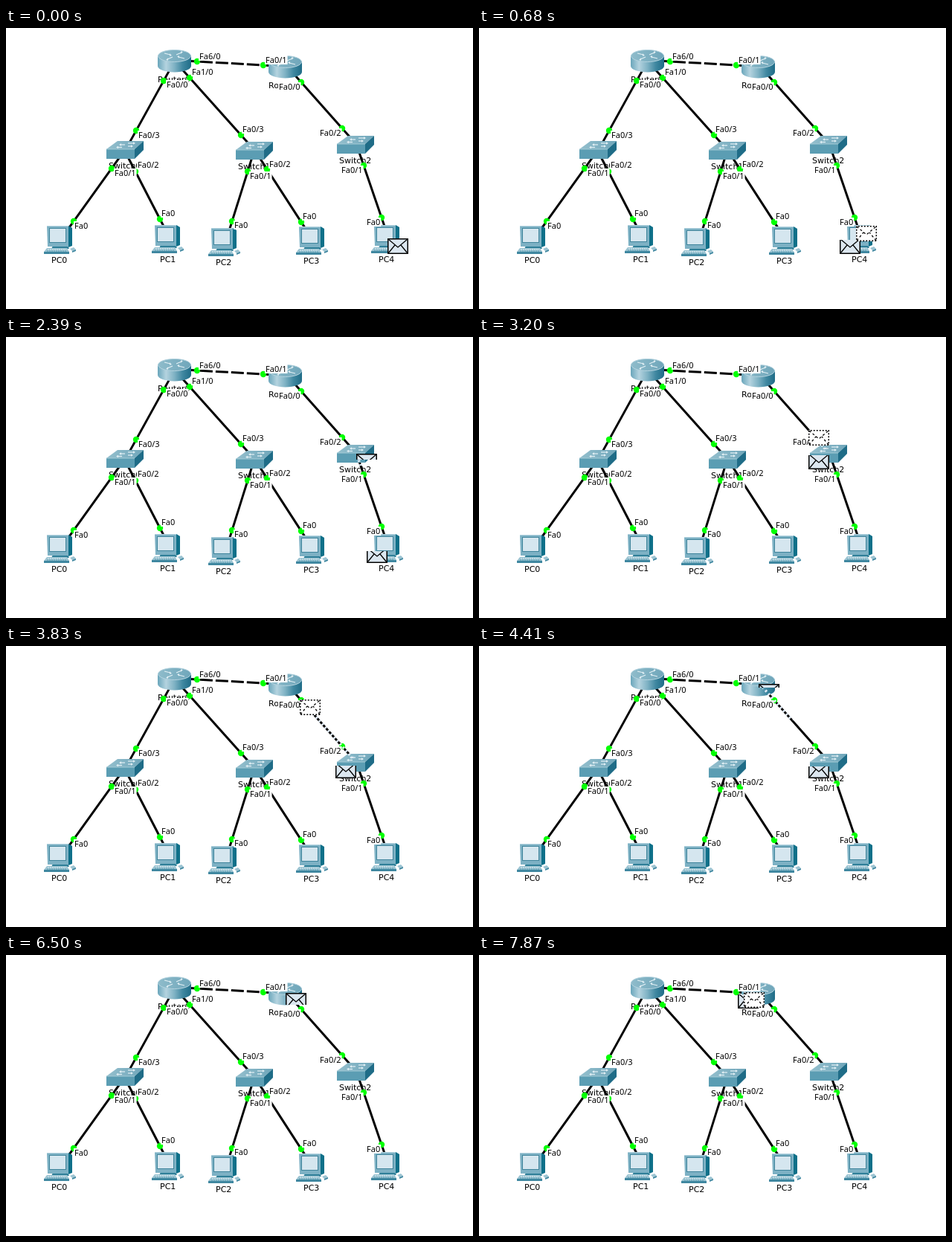
These frames come from a looping animation (628x378 px, 8 s). An HTML page with a canvas:

```html
<!DOCTYPE html>
<html lang="en">
<head>
<meta charset="utf-8">
<title>Packet travelling through a network</title>
<style>
html, body { margin: 0; width: 628px; height: 378px; overflow: hidden; background: #fff; }
canvas { display: block; }
</style>
</head>
<body>
<canvas id="stage" width="628" height="378"></canvas>
<script>
const ctx = document.getElementById('stage').getContext('2d');
const LOOP = 8000, TICK = 142;
const ENV_W = 28, ENV_H = 21;

// name: [kind, centre x, centre y, label x, label baseline]
const devices = {
  Router0: ['router', 226, 44, 204, 73],
  Router1: ['router', 375, 52, 353, 81],
  Switch0: ['switch', 160, 164, 138, 189],
  Switch1: ['switch', 334, 165, 312, 190],
  Switch2: ['switch', 470, 157, 448, 182],
  PC0: ['pc', 72, 284, 61, 316],
  PC1: ['pc', 217, 283, 207, 315],
  PC2: ['pc', 293, 287, 282, 319],
  PC3: ['pc', 411, 285, 400, 317],
  PC4: ['pc', 512, 283, 501, 315]
};

// Cables, given by the two status lights on each.
const dashedLink = [[257, 45], [346, 50]];
const routerLink = [[397, 73], [452, 135]];
const pcLink = [[481, 185], [505, 255]];
const links = [
  dashedLink, routerLink, pcLink,
  [[212, 71], [175, 138]], [[247, 67], [316, 144]],
  [[142, 189], [91, 260]], [[174, 193], [207, 257]],
  [[325, 193], [304, 260]], [[351, 190], [397, 261]]
];

const ports = [
  ['Fa6/0', 260, 42], ['Fa1/0', 250, 63], ['Fa0/0', 216, 80],
  ['Fa0/1', 349, 47], ['Fa0/0', 367, 83], ['Fa0/3', 178, 148],
  ['Fa0/3', 318, 140], ['Fa0/2', 177, 188], ['Fa0/1', 146, 199],
  ['Fa0/2', 354, 187], ['Fa0/1', 328, 203], ['Fa0/2', 422, 145],
  ['Fa0/1', 451, 195], ['Fa0', 92, 270], ['Fa0', 209, 253],
  ['Fa0', 307, 269], ['Fa0', 399, 257], ['Fa0', 485, 265]
];

// Each hop: start, arrival, end of its ghost, packet corners, progress per tick.
const hops = [
  { start: 530, arrive: 1670, ghostEnd: 2810, from: [513, 283], to: [471, 157], step: 2 / 15, link: pcLink },
  { start: 2810, arrive: 3990, ghostEnd: 6100, from: [471, 157], to: [376, 51], step: 0.1, link: routerLink },
  { start: 7750, arrive: 9000, ghostEnd: 9000, from: [376, 51], to: [226, 44], step: 2 / 15 }
];

// Times at which the packet at the second router gains a row.
const rowTimes = [5250, 5520, 5800, 6100, 6300, 6500, 6770, 6910, 7050, 7330, 7480];

const ticks = (t, start, len = TICK) => Math.floor((t - start) / len + 0.15);
const mix = (a, b, p) => a.map((v, i) => v + (b[i] - v) * p);

function poly(color, ...pts) {
  ctx.fillStyle = color;
  ctx.beginPath();
  for (let i = 0; i < pts.length; i += 2) ctx.lineTo(pts[i], pts[i + 1]);
  ctx.fill();
}

function line(a, b, color, width, dash = [], offset = 0) {
  ctx.strokeStyle = color;
  ctx.lineWidth = width;
  ctx.setLineDash(dash);
  ctx.lineDashOffset = offset;
  ctx.beginPath();
  ctx.moveTo(...a);
  ctx.lineTo(...b);
  ctx.stroke();
  ctx.setLineDash([]);
}

// A cable runs past its lights to the middle of both devices.
function cable([a, b], color, width, dash, offset) {
  line(mix(a, b, -0.36), mix(a, b, 1.36), color, width, dash, offset);
}

function arrow(x, y, dx, dy) {
  line([x, y], [x + dx, y + dy], '#e3f0f5', 1.2);
  const s = Math.sign(dx), ex = x + dx, ey = y + dy;
  poly('#e3f0f5', ex + 2 * s, ey + Math.sign(dy), ex - s, ey - 1.7, ex - s, ey + 1.7);
}

function shade(x0, x1, ...colors) {
  const g = ctx.createLinearGradient(x0, 0, x1, 0);
  colors.forEach((c, i) => g.addColorStop(i / (colors.length - 1), c));
  return g;
}

const icons = {
  router() {
    ctx.fillStyle = shade(-22, 23, '#6aa6bb', '#b4d3df', '#7fb2c4', '#3f87a0', '#1f6c87');
    ctx.beginPath();
    ctx.moveTo(-22, -7);
    ctx.lineTo(-22, 7);
    ctx.ellipse(0.5, 7, 22.5, 8.5, 0, Math.PI, 0, true);
    ctx.lineTo(23, -7);
    ctx.fill();
    ctx.fillStyle = shade(-22, 23, '#8fbccb', '#6fa6ba');
    ctx.strokeStyle = '#b4d3df';
    ctx.lineWidth = 1;
    ctx.beginPath();
    ctx.ellipse(0.5, -6.5, 22, 8, 0, 0, 7);
    ctx.fill();
    ctx.stroke();
    arrow(-13, -10, 8, 2);
    arrow(14, -3, -8, -2);
    arrow(3, -8, 7, -3);
    arrow(-2, -5, -7, 3);
  },
  switch() {
    poly(shade(-25, 25, '#94bfcd', '#6fa6ba'), -25, -1, -10, -12, 25, -12, 13, -1);
    poly('#5b9db3', -25, -1, 13, -1, 13, 12, -25, 12);
    poly('#1f6c87', 13, -1, 25, -12, 25, 0, 13, 12);
    line([-25, -1], [13, -1], '#a5cbd6', 1);
    arrow(4, -9, 8, 0);
    arrow(0, -7, -6, 0);
    arrow(4, -5, 5, 0);
    arrow(-4, -3.5, -6, 0);
  },
  pc() {
    poly('#0f7089', 12, -18, 17, -15, 17, 9, 12, 11);
    poly('#2f7f98', -9, 9, 11, 9, 13, 13, -11, 13);
    poly('#7db1c4', -17, -18, 12, -18, 12, 10, -16, 10);
    line([-17, -17.5], [12, -17.5], '#b4d3df', 1);
    poly('#3f849b', -14, -15, 9, -15, 9, 5, -14, 5);
    poly('#d5e6ef', -13, -14, 8, -14, 8, 4, -13, 4);
    poly('#9cc4d2', -17, 12, 10, 12, 13, 17, -21, 17);
    poly('#3f87a0', -21, 17, 13, 17, 13, 20, -21, 20);
    line([-16, 14], [9, 14], '#e3f0f5', 1, [2, 1]);
    line([-17, 16], [9, 16], '#5b9db3', 1, [2, 1]);
    poly('#9cc4d2', 14, 13, 19, 11, 22, 14, 17, 16);
    poly('#3f87a0', 17, 16, 22, 14, 22, 16, 17, 18);
  }
};

function drawNetwork() {
  ctx.fillStyle = '#fff';
  ctx.fillRect(0, 0, 628, 378);
  for (const link of links)
    cable(link, '#000', 3, link === dashedLink ? [17, 4] : [], 6);

  ctx.font = '11px "DejaVu Sans", sans-serif';
  for (const [name, [kind, x, y, tx, ty]] of Object.entries(devices)) {
    ctx.save();
    ctx.translate(x, y);
    icons[kind]();
    ctx.restore();
    ctx.fillStyle = '#000';
    ctx.fillText(name, tx, ty);
  }

  ctx.fillStyle = '#0f0';
  for (const light of links.flat()) {
    ctx.beginPath();
    ctx.arc(...light, 4.2, 0, 7);
    ctx.fill();
  }

  ctx.font = '11px "Noto Sans", sans-serif';
  for (const [text, x, y] of ports) {
    ctx.fillStyle = '#fff';
    ctx.fillRect(x - 1, y - 10, ctx.measureText(text).width + 2, 12);
    ctx.fillStyle = '#000';
    ctx.fillText(text, x, y);
  }
}

function envelope([x, y], { top = 0, bottom = ENV_H, dotted = false } = {}) {
  ctx.save();
  ctx.translate(Math.round(x), Math.round(y));
  ctx.beginPath();
  ctx.rect(0, top, ENV_W, bottom - top);
  ctx.clip();
  ctx.fillStyle = dotted ? '#fff' : '#dce7f0';
  ctx.fillRect(0, 0, ENV_W, ENV_H);
  ctx.strokeStyle = '#000';
  ctx.lineWidth = 1.5;
  ctx.setLineDash(dotted ? [2, 2] : []);
  ctx.strokeRect(0.75, 0.75, ENV_W - 1.5, ENV_H - 1.5);
  ctx.lineWidth = 1.3;
  ctx.setLineDash(dotted ? [3, 3] : []);
  ctx.beginPath();
  ctx.moveTo(1, 1);
  ctx.lineTo(14, 12);
  ctx.lineTo(27, 1);
  ctx.moveTo(1, 20);
  ctx.lineTo(10, 9);
  ctx.moveTo(27, 20);
  ctx.lineTo(18, 9);
  ctx.stroke();
  ctx.restore();
}

// Broken stretch of cable, between two heights, left behind the packet.
function trail(link, low, high) {
  ctx.save();
  ctx.beginPath();
  ctx.rect(0, high, 628, Math.max(0, low - high));
  ctx.clip();
  cable(link, '#dfe9f3', 3.6, [2.5, 3.5]);
  ctx.restore();
}

function arrivedRows(hop, k, t) {
  if (hop === hops[0]) return k + 3;
  const late = rowTimes.filter(r => t >= r).length;
  return late ? 10 + late : Math.min(10, k + 2);
}

function drawHop(hop, next, t) {
  const { start, arrive, ghostEnd, from, to, step, link } = hop;
  const age = ticks(t, start);
  if (t < ghostEnd) {
    const wiped = Math.min(5, Math.round(1.8 + age * 0.25));
    envelope([from[0] - ENV_W, from[1]], { top: wiped });
  }
  if (t >= next) return;

  const k = ticks(t, arrive, 139);
  const moving = k < 1;
  const moves = ticks(t, start, step === 0.1 ? 127.5 : 141.4);
  const pos = mix(from, to, Math.min(1, moves * step));
  if (link) {
    const low = from[1] - 6;
    const high = moving ? pos[1] : to[1] + 6;
    const left = moving ? low : low + (high - low) * Math.min(1, k / 5.5);
    trail(link, left, high);
  }
  if (moving) envelope(pos, { dotted: true });
  else envelope(to, { bottom: arrivedRows(hop, k, t) });
}

function render(t) {
  drawNetwork();
  if (t < hops[0].start) envelope(hops[0].from);
  hops.forEach((hop, i) => {
    if (t >= hop.start) drawHop(hop, i < 2 ? hops[i + 1].start : LOOP, t);
  });
}

const began = performance.now();
function frame() {
  render((performance.now() - began) % LOOP);
  requestAnimationFrame(frame);
}
frame();
</script>
</body>
</html>
```
